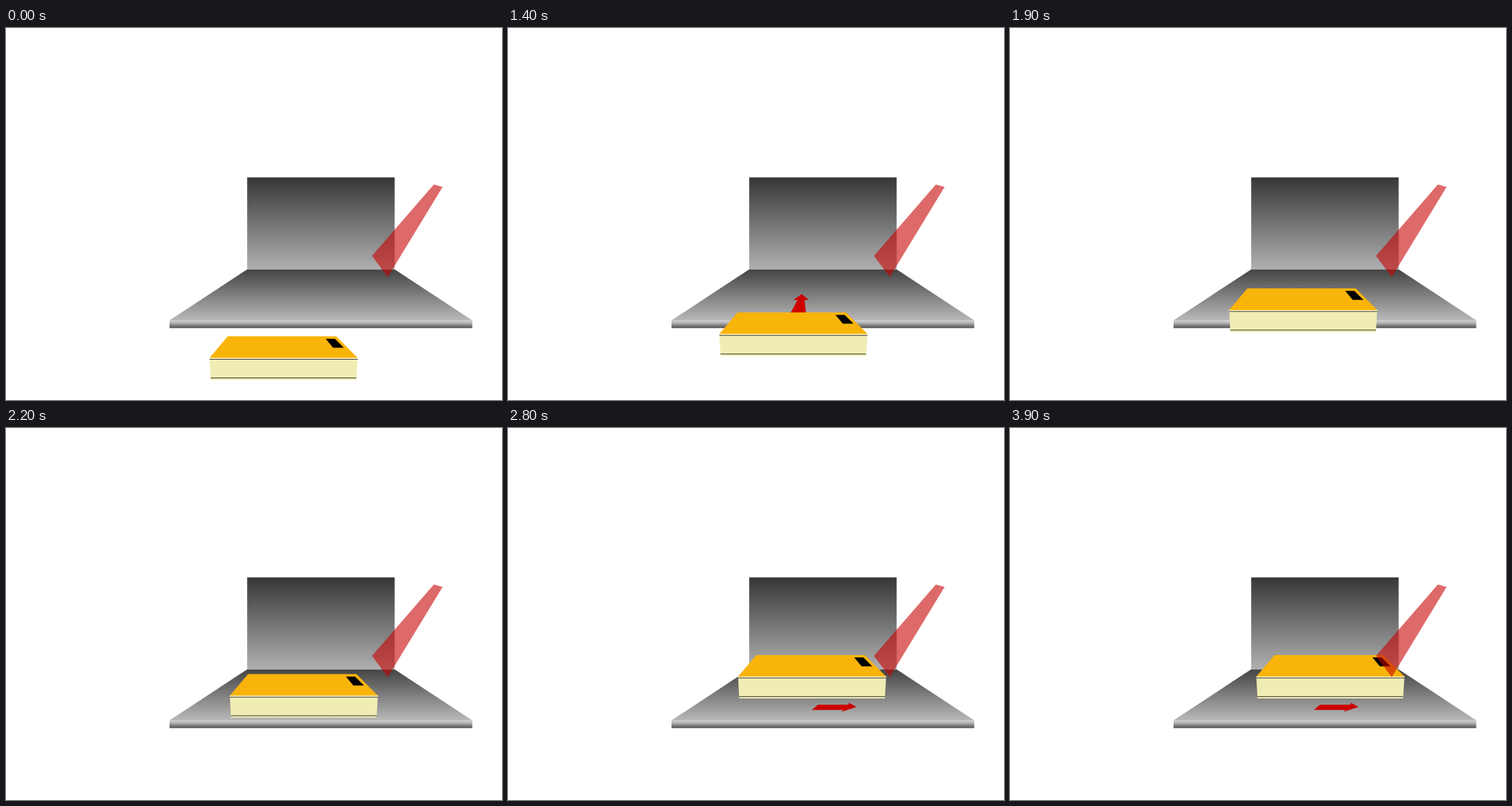
An HTML page for the animation above (5.4 s loop, 640 by 480 pixels).

```html
<!DOCTYPE html>
<html lang="en">
<head>
<meta charset="utf-8">
<title>Book scanner</title>
<style>
html, body { margin: 0; width: 100%; height: 100%; overflow: hidden; background: #fff; }
svg { display: block; width: 100vw; height: 100vh; }
</style>
</head>
<body>
<svg viewBox="0 0 640 480">
  <defs>
    <linearGradient id="wall" x2="0" y2="1">
      <stop offset="0" stop-color="#363636"/>
      <stop offset="1" stop-color="#b0b0b0"/>
    </linearGradient>
    <linearGradient id="floor" x2="0" y2="1">
      <stop offset="0" stop-color="#444"/>
      <stop offset="1" stop-color="#b8b8b8"/>
    </linearGradient>
    <linearGradient id="edge" x2="0" y2="1">
      <stop offset="0" stop-color="#d0d0d0"/>
      <stop offset="0.25" stop-color="#c0c0c0"/>
      <stop offset="1" stop-color="#505050"/>
    </linearGradient>
  </defs>

  <path fill="url(#wall)" d="M311.2 192.8H501.5V311.5H311.2Z"/>
  <path fill="url(#floor)" d="M311.2 311.4H501.5L601.6 377.2H211Z"/>
  <path fill="url(#edge)" d="M211 377H601.6V387.2H211Z"/>

  <path id="up" fill="#c00" d="M379 343.2L388 351H382.6L385 371.6H362.5L373.6 351H368Z"/>
  <path id="right" fill="#c00" d="M400 357H439.2L440 354.5L449.6 360L430 366.2L433 363.7H392Z"/>

  <g id="book">
    <path fill="#f0edb4" d="M262.6 425.2H453.8L452 454H264.2Z"/>
    <path fill="#f9b409" d="M286.2 397.8H426L453.8 425.7H262.6Z"/>
    <path fill="none" stroke="#fffbe0" d="M262.6 426.3H453.7"/>
    <path fill="none" stroke="#3c3c30" stroke-width="0.9" d="M262.7 427.5H453.7M264 451.5H452.2"/>
    <path d="M412.5 401H424.3L435.8 412.4H422Z"/>
  </g>

  <path fill="#c80000" fill-opacity="0.59" d="M552 202L563.4 205L492.6 321.4L472.2 294Z"/>
</svg>
<script>
const LOOP = 5400, STEP = 100;
const byId = id => document.getElementById(id);
const book = byId('book'), up = byId('up'), right = byId('right');

// steps taken so far in a move that makes its first step at `from`
const steps = (t, from, count) =>
  Math.max(0, Math.min(count, Math.floor((t - from) / STEP) + 1));

const show = (el, on) => el.setAttribute('visibility', on ? 'visible' : 'hidden');

function draw(now) {
  const t = now % LOOP;
  const push = steps(t, 1000, 17) / 17;
  const slide = steps(t, 3100, 9) / 9;
  const x = 34.2 * push + 21 * slide;
  const y = -104.9 * push;
  book.setAttribute('transform', `translate(${x.toFixed(2)} ${y.toFixed(2)})`);
  show(up, t >= 200 && t < 1900);
  show(right, t >= 2800);
}

const start = performance.now();
function tick() {
  draw(performance.now() - start);
  requestAnimationFrame(tick);
}
tick();
</script>
</body>
</html>
```
